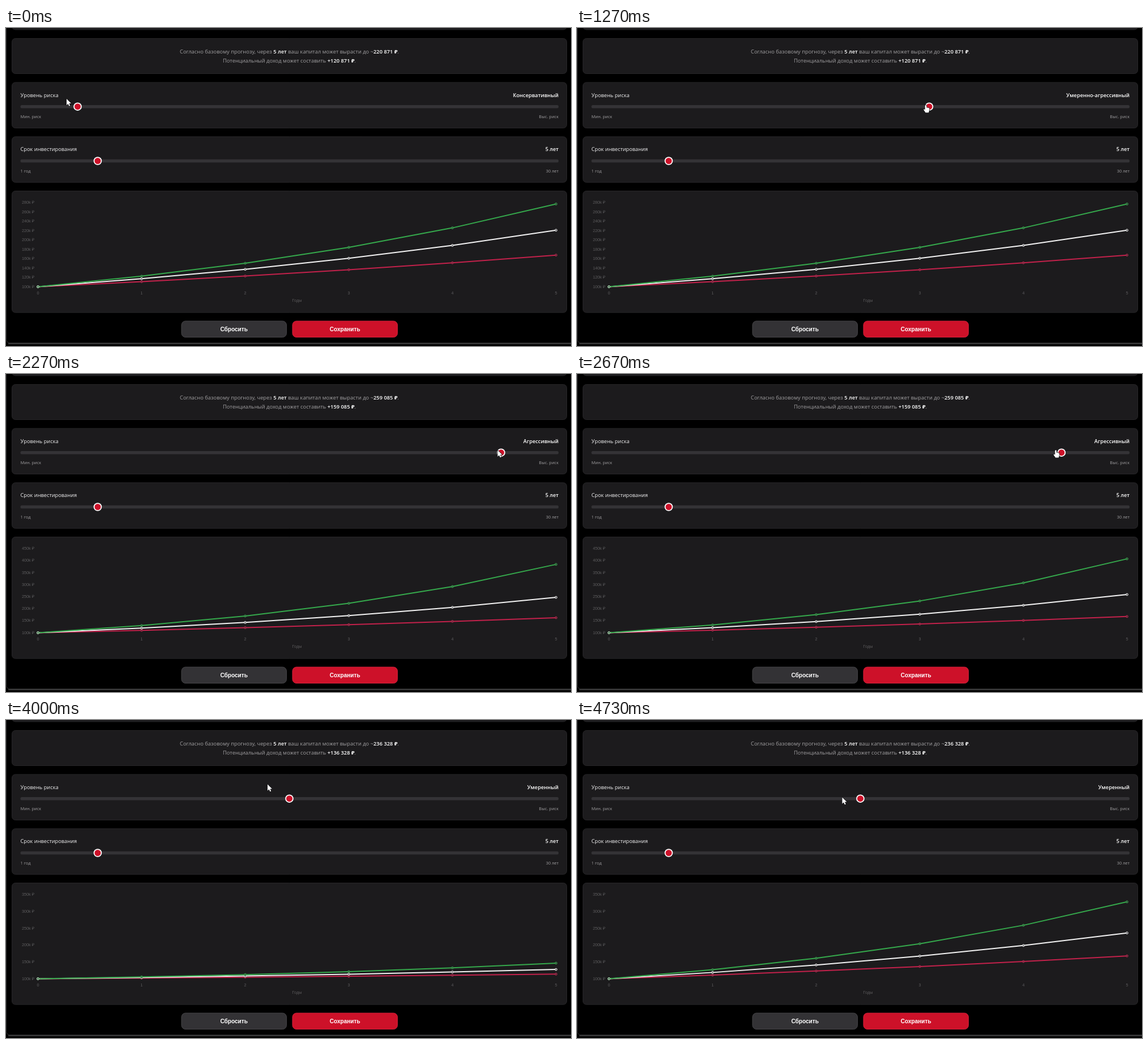
These frames come from a looping animation (998x561 px, 4.8 s). An HTML page with a canvas:

```html
<!DOCTYPE html>
<html lang="ru">
<head>
<meta charset="utf-8">
<title>Прогноз капитала</title>
<style>
html, body { margin: 0; width: 100%; height: 100%; overflow: hidden; background: #000; }
canvas { display: block; width: 998px; height: 561px; }
</style>
</head>
<body>
<canvas id="stage" width="998" height="561"></canvas>
<script>
const ctx = document.getElementById('stage').getContext('2d');
const LOOP = 4800, FPS = 15;
const UI = '"Open Sans", "Noto Sans", sans-serif';
const ARIAL = '"Liberation Sans", Arial, sans-serif';
const RED = '#cd1129', LABEL = '#f2f2f3', MUTED = '#a09fa1';

// Final amounts after five years, in thousands.
const forecasts = [
  { from: -2000, low: 167.7, base: 220.871, high: 277, top: 280, step: 20 },
  { from: 1790, low: 167.7, base: 259.085, high: 407.4, top: 450, step: 50 },
  { from: 3945, low: 167.9, base: 236.328, high: 328.9, top: 350, step: 50 }
];
const levels = ['Консервативный', 'Умеренно-консервативный', 'Умеренный',
  'Умеренно-агрессивный', 'Агрессивный'];

// [time, value...]
const riskKeys = [[720, 10], [1620, 90], [2580, 90], [3230, 39], [3290, 39], [3690, 50]];
const cursorKeys = [[0, 107, 125], [480, 129, 138], [720, 129, 138], [1620, 868.5, 134.5],
  [2580, 868.5, 134.5], [3230, 398.5, 124.5], [3290, 398.5, 124.5], [3690, 501, 126],
  [3820, 501, 126], [3990, 462, 113.5], [4400, 463, 113], [4700, 468.5, 136.5]];

const smooth = p => p * p * (3 - 2 * p);
const easeOutQuart = p => 1 - (1 - p) ** 4;

function track(keys, t) {
  const next = keys.findIndex(k => k[0] > t);
  if (next === 0) return keys[0].slice(1);
  if (next < 0) return keys[keys.length - 1].slice(1);
  const a = keys[next - 1], b = keys[next];
  const p = smooth((t - a[0]) / (b[0] - a[0]));
  return a.slice(1).map((v, i) => v + (b[i + 1] - v) * p);
}

function text(str, x, y, size, color, align = 'left', weight = 400, family = UI) {
  ctx.font = `${weight} ${size}px ${family}`;
  ctx.fillStyle = color;
  ctx.textAlign = align;
  ctx.fillText(str, x, y);
}

// Centres a line in which **marked** parts are bold.
function richLine(str, cx, y) {
  const size = 9.35;
  const runs = str.split('**').map((part, i) => {
    const weight = i % 2 ? 600 : 400;
    ctx.font = `${weight} ${size}px ${UI}`;
    return { part, weight, width: ctx.measureText(part).width };
  });
  let x = cx - runs.reduce((sum, r) => sum + r.width, 0) / 2;
  for (const r of runs) {
    text(r.part, x, y, size, r.weight > 400 ? '#fff' : MUTED, 'left', r.weight);
    x += r.width;
  }
}

function box(x, y, w, h, r, fill, stroke) {
  ctx.beginPath();
  ctx.roundRect(x, y, w, h, r);
  ctx.fillStyle = fill;
  ctx.fill();
  if (!stroke) return;
  ctx.strokeStyle = stroke;
  ctx.lineWidth = 1;
  ctx.stroke();
}

function disc(x, y, r, color) {
  ctx.beginPath();
  ctx.arc(x, y, r, 0, 7);
  ctx.fillStyle = color;
  ctx.fill();
}

const panel = (y, h) => box(10.5, y, 980, h, 6, '#1c1b1d', '#272628');

function slider(y, title, value, min, max, share) {
  panel(y, 80.5);
  text(title, 25.5, y + 25.5, 9.25, LABEL, 'left', 500);
  text(value, 976, y + 25.5, 9.25, '#fff', 'right', 600);
  box(25.5, y + 40, 950.5, 5.5, 2.5, '#343336');
  text(min, 25.5, y + 63, 7.45, MUTED);
  text(max, 976, y + 63, 7.45, MUTED, 'right');
  const x = 33 + 935 * share;
  disc(x, y + 42.7, 7.3, '#fff');
  disc(x, y + 42.7, 5.5, RED);
}

function chart(f, t) {
  panel(287.5, 214.5);
  const bottom = 456.5, height = 148.5, axis = '#5c5b5d';
  const px = height / (f.top - 100);
  for (let k = 100; k <= f.top; k += f.step)
    text(k + 'k ₽', 50, bottom - (k - 100) * px + 2.2, 7.3, axis, 'right', 400, ARIAL);
  const xAt = i => 56.5 + 183 * i;
  for (let i = 0; i <= 5; i++) text(i, xAt(i), 470, 7.3, axis, 'center', 400, ARIAL);
  text('Годы', 514, 483, 7.3, axis, 'center', 400, ARIAL);

  const grown = easeOutQuart(Math.min(1, (t - f.from) / 1000));
  for (const [end, color] of [[f.low, '#c3214b'], [f.base, '#f3f3f3'], [f.high, '#35a94c']]) {
    const yAt = i => bottom - (100 * (end / 100) ** (i / 5) - 100) * px * grown;
    ctx.strokeStyle = color;
    ctx.lineWidth = 2;
    ctx.lineJoin = 'round';
    ctx.beginPath();
    for (let i = 0; i <= 5; i++) ctx.lineTo(xAt(i), yAt(i));
    ctx.stroke();
    ctx.lineWidth = 1;
    for (let i = 0; i <= 5; i++) {
      disc(xAt(i), yAt(i), 1.9, 'rgba(70,70,72,.55)');
      ctx.stroke();
    }
  }
  ctx.strokeStyle = '#b9d9bf';
  ctx.beginPath();
  ctx.arc(xAt(0), bottom, 1.9, 0, 7);
  ctx.stroke();
}

const arrow = new Path2D('M0 0V11.2L2.6 8.8L4.4 12.8L6.3 12L4.5 8.1H8Z');
const hand = new Path2D('M-1.3 1.2Q0-.8 1.3 1.2V4.6L5.4 5.4Q6.6 5.8 6.5 7.2L5.8 11' +
  'L5 13.6H-.4L-3.6 8.9Q-4 7.3-2.6 7.5L-1.3 8.6Z');

function cursor(t) {
  const [x, y] = track(cursorKeys, t);
  const pointing = (t > 430 && t < 1640) || (t > 2600 && t < 3880);
  const shape = pointing ? hand : arrow;
  ctx.save();
  ctx.translate(x, y);
  ctx.strokeStyle = '#171618';
  ctx.lineWidth = 1.4;
  ctx.stroke(shape);
  ctx.fillStyle = '#fff';
  ctx.fill(shape);
  ctx.restore();
}

function button(x, label, fill, stroke) {
  box(x, 517, 185.5, 28.5, 7, fill, stroke);
  text(label, x + 92.7, 534.6, 10.1, '#fff', 'center', 700, ARIAL);
}

function draw(t) {
  ctx.fillStyle = '#000';
  ctx.fillRect(0, 0, 998, 561);
  box(.5, -20, 1010, 575.5, 6, '#000', '#2c2c2d');
  ctx.fillStyle = '#363637';
  ctx.fillRect(4, 555.5, 994, 2.5);

  const f = forecasts.filter(item => item.from <= t).pop();
  const money = k => String(Math.round(k * 1000)).replace(/(?=\d{3}$)/, ' ') + ' ₽';
  panel(-20, 23);
  panel(18.5, 62);
  richLine(`Согласно базовому прогнозу, через **5 лет** ваш капитал может вырасти до ~**${money(f.base)}**.`, 500.5, 45.3);
  richLine(`Потенциальный доход может составить **+${money(f.base - 100)}**.`, 500.5, 61.2);

  const risk = Math.round(track(riskKeys, t)[0]);
  slider(96, 'Уровень риска', levels[Math.min(4, Math.floor(risk / 20))],
    'Мин. риск', 'Выс. риск', risk / 100);
  slider(191.8, 'Срок инвестирования', '5 лет', '1 год', '30 лет', 4 / 29);
  chart(f, t);
  button(310, 'Сбросить', '#333235', '#454447');
  button(506, 'Сохранить', RED, '#d4203a');
  cursor(t);
}

const start = performance.now();
function frame() {
  const t = (performance.now() - start) % LOOP;
  // The small lead keeps frames on the 10 ms grid of the clock.
  draw(Math.floor((t + 4) * FPS / 1000) * 1000 / FPS);
  requestAnimationFrame(frame);
}
frame();
</script>
</body>
</html>
```
